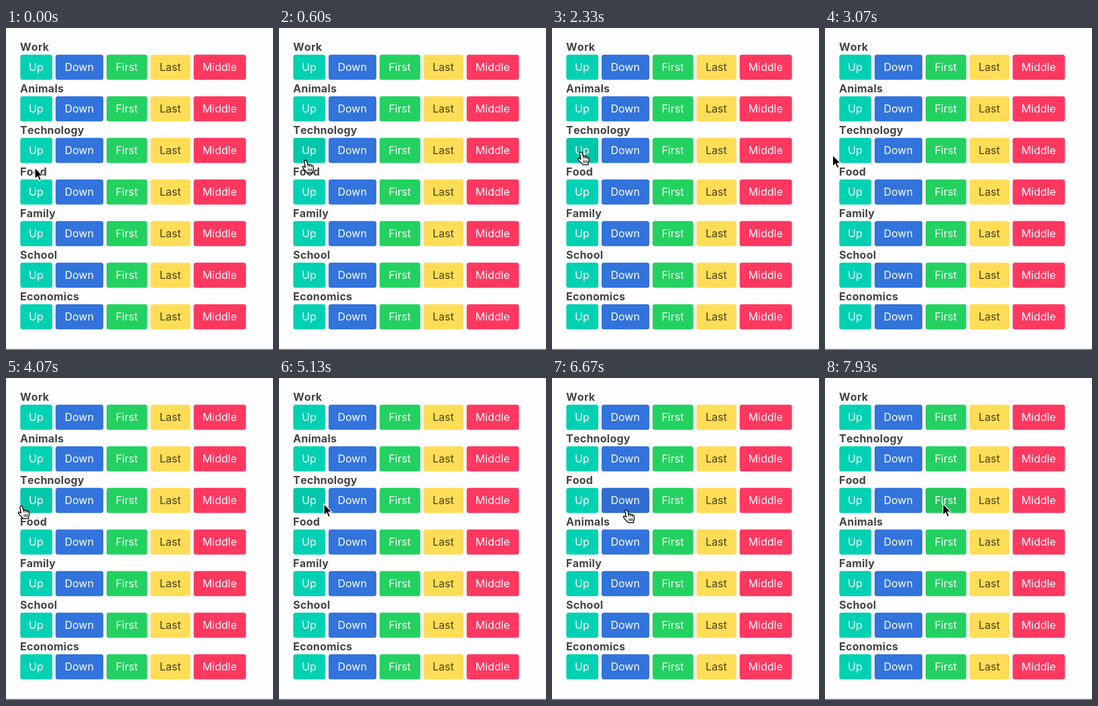
Write an HTML page that moves like this. It is 398 by 480 pixels and loops after 8000 ms.

```html
<!DOCTYPE html>
<html lang="en">
<head>
<meta charset="utf-8">
<style>
html, body { margin: 0; width: 100%; height: 100%; overflow: hidden; background: #fefdff; }
svg { display: block; width: 398px; height: 480px; font: 16px Inter, sans-serif; }
.title { font-weight: 700; font-kerning: none; letter-spacing: .25px; fill: #444; }
.label { text-anchor: middle; }
.hover { filter: brightness(.95); }
</style>
</head>
<body>
<svg id="stage" viewBox="0 0 398 480"></svg>
<script>
const LOOP = 8000, STEP = 200 / 3, LAG = 130;
const LEFT = 21.3, TOP = 39.7, ROW = 62, HEIGHT = 37.5, GAP = 4.8;
const stage = document.getElementById('stage');

const BUTTONS = [
  { label: 'Up', width: 47.8, fill: '#00d1b2' },
  { label: 'Down', width: 71.2, fill: '#3273dc' },
  { label: 'First', width: 60.7, fill: '#23d160' },
  { label: 'Last', width: 59.5, fill: '#ffdd57', color: '#4b431f' },
  { label: 'Middle', width: 78, fill: '#ff3860' }
];
BUTTONS.reduce((x, button) => {
  button.x = x;
  return x + button.width + GAP;
}, LEFT);

const TOPICS = ['Work', 'Animals', 'Technology', 'Food', 'Family', 'School', 'Economics'];

// each click swaps a row with the one below it
const CLICKS = [{ at: 5600, row: 1 }, { at: 6350, row: 2 }];

// resting points of the pointer tip: time, x, y
const STOPS = [
  [0, 43, 208], [1270, 36, 185], [1570, 3, 187], [2200, 45, 185],
  [3300, 7, 190], [4070, 23, 191], [5000, 71, 188], [5500, 48, 186],
  [6400, 111, 197], [7700, 112, 197], [8000, 185, 186]
];

function add(tag, attrs, parent = stage, text = '') {
  const el = document.createElementNS('http://www.w3.org/2000/svg', tag);
  for (const key in attrs) el.setAttribute(key, attrs[key]);
  el.textContent = text;
  return parent.appendChild(el);
}

const rows = TOPICS.map((topic, i) => {
  const y = TOP + i * ROW;
  const title = add('text', { x: 21, y: y - 5.7, class: 'title' }, stage, topic);
  const boxes = BUTTONS.map(({ label, x, width, fill, color = '#fff' }) => {
    const box = add('rect', { x, y, width, height: HEIGHT, rx: 3.5, fill });
    add('text', { x: x + width / 2 - .3, y: y + 24.7, fill: color, class: 'label' }, stage, label);
    return box;
  });
  return { title, boxes };
});
add('rect', { x: 0, y: 478.5, width: 398, height: 1.5, fill: '#77767a' });

const arrow = add('path', {
  d: 'M0 0V17L4 13.4L6.6 19.6L9.5 18.3L6.9 12.3H12Z',
  fill: '#000', stroke: '#fff', 'stroke-width': 1.2
});
const hand = add('g', { stroke: '#000', 'stroke-linecap': 'round', 'stroke-linejoin': 'round' });
add('path', {
  d: 'M-2.2 1.5Q-1.8-.6 0-.4Q1.5-.2 1.9 1.8L3 6.2Q4.2 5 5.6 6.5Q7.2 5.6 8.4 7.3Q10.4 6.6 11.2 9' +
     'Q12.2 13 10.6 16V18.6H2.4Q1 16.5-2.5 13.5L-4.6 10.4Q-5 8.4-2.6 9L-.6 10.4Z',
  fill: '#fff', 'stroke-width': 1.3
}, hand);
add('path', { d: 'M3 6.2L3.5 9M5.6 6.7L6 9.2M8.4 7.5L8.7 9.6M4 12.5V16M6.3 12.5V16M8.6 12.5V16', fill: 'none' }, hand);

function pointer(t) {
  const i = Math.max(1, STOPS.findIndex(stop => stop[0] >= t));
  const [t0, x0, y0] = STOPS[i - 1], [t1, x1, y1] = STOPS[i];
  const u = (t - t0) / (t1 - t0), ease = u * u * (3 - 2 * u);
  return [x0 + (x1 - x0) * ease, y0 + (y1 - y0) * ease];
}

function hit([x, y]) {
  const row = Math.floor((y - TOP) / ROW);
  if (y - TOP - row * ROW > HEIGHT) return null;
  const col = BUTTONS.findIndex(b => x >= b.x && x <= b.x + b.width);
  return col < 0 ? null : rows[row].boxes[col];
}

function render(t) {
  const order = [...TOPICS];
  for (const { at, row } of CLICKS) {
    if (t >= at) [order[row], order[row + 1]] = [order[row + 1], order[row]];
  }
  const tip = pointer(t), hovered = hit(tip);
  rows.forEach(({ title, boxes }, i) => {
    title.textContent = order[i];
    for (const box of boxes) box.classList.toggle('hover', box === hovered);
  });

  // the pointer becomes a hand shortly after entering a button
  const linked = hovered && hit(pointer(Math.max(0, t - LAG))) === hovered;
  for (const shape of [arrow, hand]) {
    shape.setAttribute('transform', `translate(${tip[0].toFixed(1)} ${tip[1].toFixed(1)})`);
  }
  hand.style.display = linked ? '' : 'none';
  arrow.style.display = linked ? 'none' : '';
}

function tick() {
  const t = performance.now() % LOOP;
  render(Math.min(LOOP, Math.floor((t + 5) / STEP) * STEP));
  requestAnimationFrame(tick);
}
tick();
</script>
</body>
</html>
```
